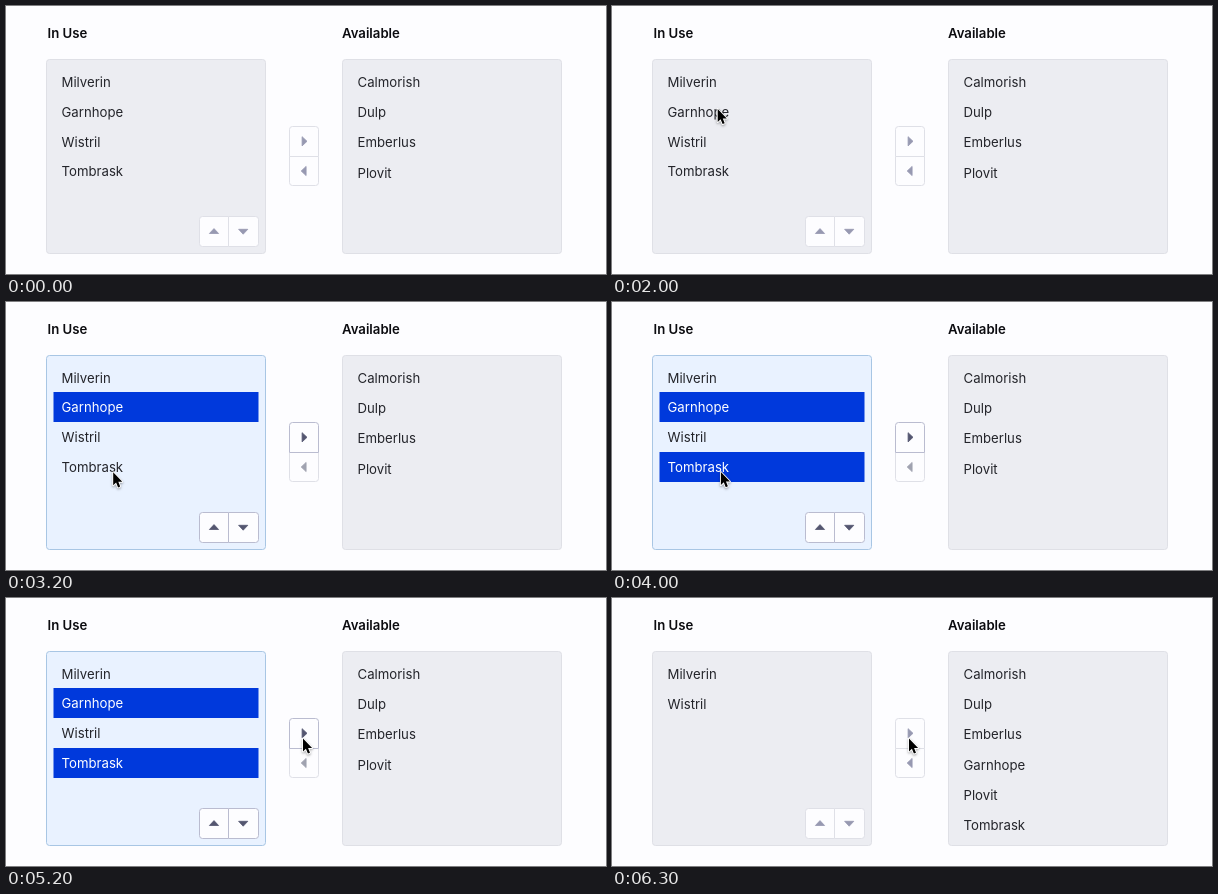
These frames come from a looping animation (600 by 268 pixels, 7.6 s). An HTML page with a canvas:

```html
<!DOCTYPE html>
<html lang="en">
<head>
<meta charset="utf-8">
<title>List transfer</title>
<style>
html, body { margin: 0; width: 100%; height: 100%; overflow: hidden; background: #fdfdff; }
canvas { display: block; width: 600px; height: 268px; }
</style>
</head>
<body>
<canvas id="stage"></canvas>
<script>
const W = 600, H = 268, LOOP = 7600, STEP = 100;
const MOVED_AT = 5500;
const canvas = document.getElementById('stage');
const ctx = canvas.getContext('2d');
const ratio = window.devicePixelRatio || 1;
canvas.width = Math.round(W * ratio);
canvas.height = Math.round(H * ratio);

const PAGE = [253, 253, 255], INK = [35, 36, 42], HEADING = [12, 12, 16];
const WHITE = [255, 255, 255];
const GREY = [236, 237, 242], GREY_EDGE = [223, 224, 230];
const TINT = [233, 242, 255], TINT_EDGE = [168, 198, 228];
const BLUE = [0, 57, 220];
const ARROW = [151, 153, 177], ARROW_ON = [84, 86, 112], ARROW_OFF = [160, 162, 176];
const EDGE = [223, 224, 231], EDGE_ON = [186, 188, 208];

// Rows: name, resting text centre, centre while the list is active
const inUse = [
  ['Milverin', 76, 76],
  ['Garnhope', 106, 105],
  ['Wistril', 136.4, 135],
  ['Tombrask', 165, 165]
];
const available = ['Calmorish', 'Dulp', 'Emberlus', 'Plovit'];
const availableAfter = ['Calmorish', 'Dulp', 'Emberlus', 'Garnhope', 'Plovit', 'Tombrask'];

const easeIn = u => u * u;
const easeOut = u => 1 - (1 - u) * (1 - u);
const smooth = u => u * u * (3 - 2 * u);

// Pointer legs: start, end, from, to, easing
const legs = [
  [1000, 1800, [199.7, 255], [105.7, 103], easeOut],
  [2500, 2800, [105.7, 103], [106.2, 119.5], easeIn],
  [2800, 3200, [106.2, 119.5], [107.2, 170.3], easeOut],
  [3900, 4700, [107.2, 170.3], [214.5, 155.5], easeIn],
  [4700, 5200, [214.5, 155.5], [297, 140.5], easeOut]
];

const clamp = v => Math.max(0, Math.min(1, v));
const span = (t, a, b) => clamp((t - a) / (b - a));
const lerp = (a, b, u) => a + (b - a) * u;
const mix = (a, b, u) => a.map((v, i) => lerp(v, b[i], u));
const rgb = (c, alpha = 1) => `rgba(${c.map(Math.round).join(',')},${alpha})`;

function pointerAt(t) {
  if (t < legs[0][0]) return null;
  const [a, b, from, to, ease] = legs.filter(leg => t >= leg[0]).pop();
  return mix(from, to, ease(span(t, a, b)));
}

function box(x, y, w, h, r, fill, edge) {
  ctx.beginPath();
  ctx.roundRect(x + 0.5, y + 0.5, w - 1, h - 1, r);
  ctx.fillStyle = rgb(fill);
  ctx.fill();
  ctx.strokeStyle = rgb(edge);
  ctx.lineWidth = 1;
  ctx.stroke();
}

function label(text, x, centre, color, weight = 400) {
  ctx.font = `${weight} 13.2px Inter, sans-serif`;
  ctx.fillStyle = rgb(color);
  ctx.fillText(text, x, centre + 4.7);
}

function triangle(x, y, angle, color) {
  ctx.save();
  ctx.translate(x, y);
  ctx.rotate(angle);
  ctx.beginPath();
  ctx.moveTo(2.6, 0);
  ctx.lineTo(-2.3, -4.6);
  ctx.lineTo(-2.3, 4.6);
  ctx.closePath();
  ctx.fillStyle = ctx.strokeStyle = rgb(color);
  ctx.lineJoin = 'round';
  ctx.lineWidth = 0.8;
  ctx.fill();
  ctx.stroke();
  ctx.restore();
}

function buttons(on) {
  const edge = mix(EDGE, EDGE_ON, on);
  const arrow = mix(ARROW, ARROW_ON, on);

  box(193, 210, 30, 31, [3, 0, 0, 3], PAGE, edge);
  box(222, 210, 31, 31, [0, 3, 3, 0], PAGE, edge);
  triangle(208, 225.2, -Math.PI / 2, arrow);
  triangle(237.2, 225.6, Math.PI / 2, arrow);

  box(283, 150, 30, 30, [0, 0, 3, 3], PAGE, EDGE);
  box(283, 120, 30, 31, [3, 3, 0, 0], PAGE, edge);
  triangle(298.4, 135.3, 0, arrow);
  triangle(297.8, 165, Math.PI, mix(ARROW, ARROW_OFF, on));
}

function selectable(row, on, picked) {
  const [name, rest, active] = row;
  if (picked > 0) {
    ctx.fillStyle = rgb(BLUE, picked);
    ctx.fillRect(47.5, active - 15, 205, 30);
  }
  label(name, 55.5, lerp(rest, active, on), mix(INK, WHITE, picked));
}

function pointer([x, y]) {
  ctx.save();
  ctx.translate(x, y);
  ctx.beginPath();
  [[0, 0], [0, 13], [2.9, 10.3], [4.9, 15.1], [7, 14.2], [5.1, 9.5], [9.1, 9.5]]
    .forEach(p => ctx.lineTo(...p));
  ctx.closePath();
  ctx.lineJoin = 'round';
  ctx.lineWidth = 1.8;
  ctx.strokeStyle = '#fff';
  ctx.shadowColor = 'rgba(0,0,0,.35)';
  ctx.shadowBlur = 2.5 * ratio;
  ctx.shadowOffsetY = 1.2 * ratio;
  ctx.stroke();
  ctx.shadowColor = 'transparent';
  ctx.fillStyle = '#000';
  ctx.fill();
  ctx.restore();
}

function draw(t) {
  const moved = t >= MOVED_AT;
  const on = moved ? 0 : smooth(span(t, 2000, 2400));
  const second = moved ? 0 : span(t, 3300, 3500);

  ctx.setTransform(ratio, 0, 0, ratio, 0, 0);
  ctx.fillStyle = rgb(PAGE);
  ctx.fillRect(0, 0, W, H);

  label('In Use', 41.5, 27.3, HEADING, 600);
  label('Available', 336, 27.3, HEADING, 600);
  box(40, 53, 220, 195, 3, mix(GREY, TINT, on), mix(GREY_EDGE, TINT_EDGE, on));
  box(336, 53, 220, 195, 3, GREY, GREY_EDGE);

  if (moved) {
    label(inUse[0][0], 55.5, 76, INK);
    label(inUse[2][0], 55.5, 106, INK);
  } else {
    const picks = [0, on, 0, second];
    inUse.forEach((row, i) => selectable(row, on, picks[i]));
  }
  (moved ? availableAfter : available)
    .forEach((name, i) => label(name, 351.5, 76 + i * 30.3, INK));

  buttons(on);
  const at = pointerAt(t);
  if (at) pointer(at);
}

const start = performance.now();
function tick() {
  const t = (performance.now() - start) % LOOP;
  draw(Math.floor(t / STEP) * STEP);
  requestAnimationFrame(tick);
}
tick();
</script>
</body>
</html>
```
